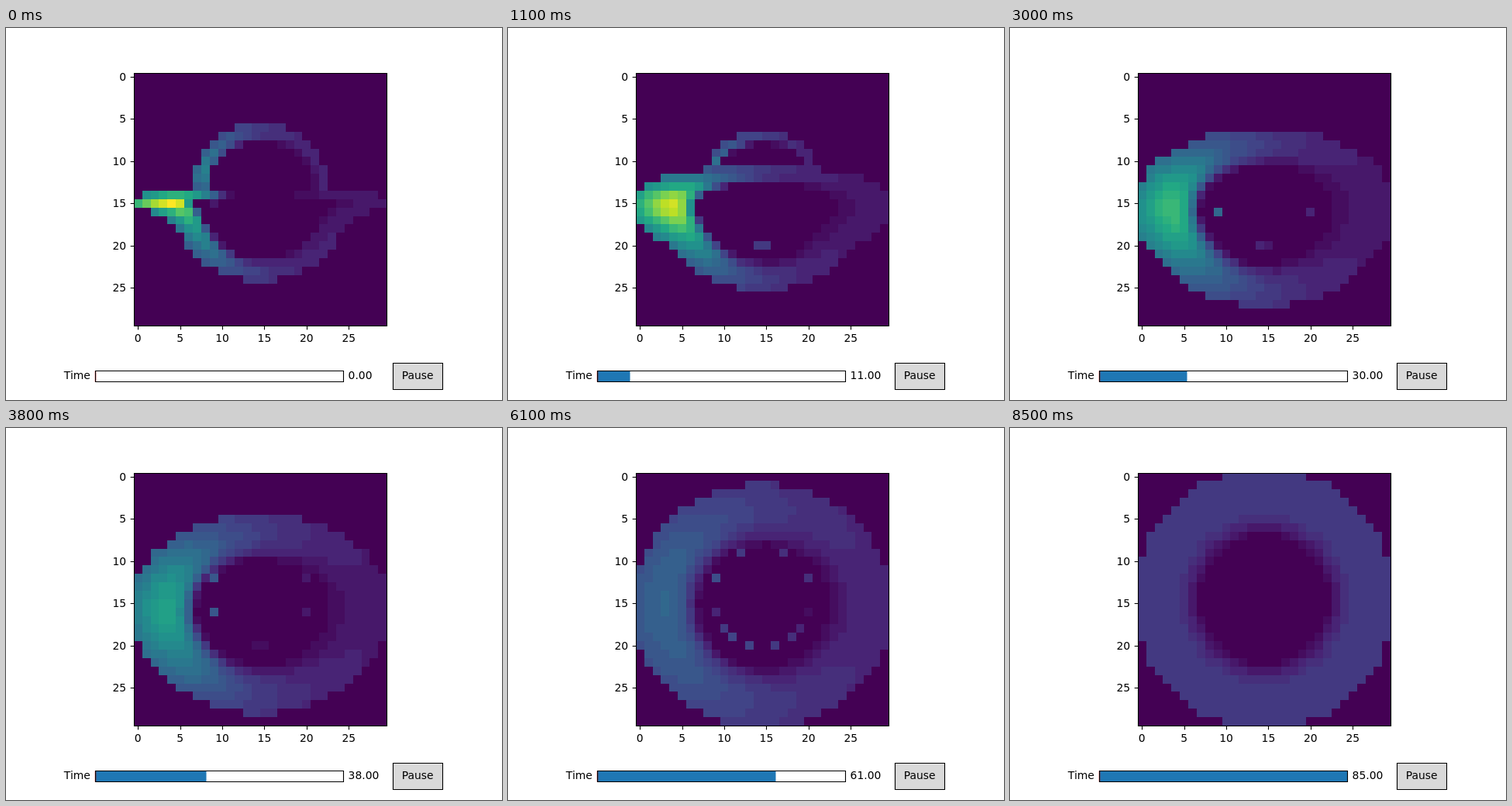
Animation of 640 by 480 pixels, one loop 8.6 s. Source, as an HTML page:

```html
<!DOCTYPE html>
<html lang="en">
<head>
<meta charset="utf-8">
<title>Disk</title>
<style>
html, body { margin: 0; width: 100%; height: 100%; overflow: hidden; background: #fff; }
svg { display: block; width: 640px; height: 480px; }
text { font: 13.89px "DejaVu Sans", sans-serif; fill: #000; }
.end { text-anchor: end; }
.mid { text-anchor: middle; }
.line { fill: none; stroke: #000; stroke-width: 1.11; }
</style>
</head>
<body>
<svg id="stage" viewBox="0 0 640 480">
  <rect x="165" y="58" width="326" height="326" fill="#440154"/>
  <g id="cells" shape-rendering="crispEdges"></g>
  <path class="line" d="M165.5 58.5H491.5V384.5H165.5Z"/>
  <g id="ticks"></g>
  <text class="end" x="108.8" y="453">Time</text>
  <rect id="bar" x="115.5" y="442.5" height="14" fill="#1f77b4"/>
  <path d="M115.5 442.5V456.5" stroke="#f00" stroke-width="1.39"/>
  <path class="line" d="M115.5 442.5H435.5V456.5H115.5Z"/>
  <text id="value" x="441.6" y="453">0.00</text>
  <path class="line" style="fill:#d9d9d9" d="M499.5 432.5H563.5V466.5H499.5Z"/>
  <text class="mid" x="531.2" y="453">Pause</text>
</svg>
<script>
const N = 30, CELL = 10.88, LEFT = 164.8, TOP = 57.6;
const STEPS = 86, STEP_MS = 100, START_DEG = 85;
const HALF = 14, R_IN = 6, R_OUT = 13.995;
const LEVELS = 30, RAD = Math.PI / 180;
const $ = id => document.getElementById(id);

function add(parent, name, attrs, text) {
  const el = document.createElementNS('http://www.w3.org/2000/svg', name);
  for (const k in attrs) el.setAttribute(k, attrs[k]);
  if (text !== undefined) el.textContent = text;
  parent.appendChild(el);
  return el;
}

const stops = ['440154', '482475', '414487', '35608d', '2a788e', '21918c',
  '22a884', '44bf70', '7ad151', 'bddf26', 'fde725']
  .map(h => [0, 2, 4].map(i => parseInt(h.substr(i, 2), 16)));

function viridis(v) {
  const p = Math.min(Math.max(v, 0), 1) * (stops.length - 1);
  const i = Math.min(Math.floor(p), stops.length - 2);
  return 'rgb(' + stops[i].map((c, k) =>
    Math.round(c + (stops[i + 1][k] - c) * (p - i))) + ')';
}

// Light path around the hole: u = 1/r for each degree of travel (u'' = 3u² - u).
function lightPath(b) {
  const path = new Float64Array(362), h = RAD, acc = u => 3 * u * u - u;
  let u = 0, w = 1 / b;
  for (let k = 1; k < path.length; k++) {
    const a1 = acc(u);
    const w2 = w + a1 * h / 2, a2 = acc(u + w * h / 2);
    const w3 = w + a2 * h / 2, a3 = acc(u + w2 * h / 2);
    const w4 = w + a3 * h, a4 = acc(u + w3 * h);
    u += h / 6 * (w + 2 * w2 + 2 * w3 + w4);
    w += h / 6 * (a1 + 2 * a2 + 2 * a3 + a4);
    if (u <= 0) break;
    if (u > 0.5) { path.fill(1, k); break; }
    path[k] = u;
  }
  return path;
}

function radiusAt(path, phi) {
  const p = phi / RAD, k = Math.floor(p);
  return 1 / (path[k] + (path[k + 1] - path[k]) * (p - k));
}

// Thin disk flux, before the frequency shift.
function flux(r) {
  const q = Math.sqrt(r), a = Math.sqrt(3), c = Math.sqrt(6);
  const log = Math.log((q + a) * (c - a) / ((q - a) * (c + a)));
  return (q - c + a / 2 * log) / ((r - 3) * r ** 2.5);
}

function brightness(cell, tilt) {
  const s = Math.sin(tilt);
  const phi = Math.atan2(Math.cos(tilt), -s * cell.y / cell.b);
  for (const turn of [0, Math.PI]) {
    const r = radiusAt(cell.path, phi + turn);
    if (r > R_IN && r < R_OUT) {
      const shift = 1 + cell.x * s * r ** -1.5;
      return flux(r) * (1 - 3 / r) ** 2 / shift ** 4;
    }
  }
  return 0;
}

const cells = [];
const edge = (start, k) => Math.round(start + k * CELL);
for (let row = 0; row < N; row++) {
  for (let col = 0; col < N; col++) {
    const x = (2 * col / (N - 1) - 1) * HALF, y = (2 * row / (N - 1) - 1) * HALF;
    const b = Math.hypot(x, y), px = edge(LEFT, col), py = edge(TOP, row);
    const el = add($('cells'), 'rect', {
      x: px, y: py,
      width: edge(LEFT, col + 1) - px, height: edge(TOP, row + 1) - py
    });
    cells.push({ x, y, b, el, path: lightPath(b) });
  }
}
const peak = Math.max(...cells.map(c => brightness(c, START_DEG * RAD)));

for (let v = 0; v < N; v += 5) {
  const x = LEFT + (v + 0.5) * CELL, y = TOP + (v + 0.5) * CELL;
  add($('ticks'), 'path', { class: 'line', d: `M${Math.round(x) + 0.5} 384.5v4.86` });
  add($('ticks'), 'path', { class: 'line', d: `M165.5 ${Math.round(y) + 0.5}h-4.86` });
  add($('ticks'), 'text', { class: 'mid', x, y: 405 }, v);
  add($('ticks'), 'text', { class: 'end', x: 155.1, y: Math.round(y + 5) }, v);
}

function draw(step) {
  const tilt = (START_DEG - step) * RAD;
  for (const c of cells) {
    const v = Math.round(brightness(c, tilt) / peak * LEVELS) / LEVELS;
    c.el.setAttribute('fill', viridis(v));
  }
  $('bar').setAttribute('width', Math.round(115.2 + 320 * step / (STEPS - 1)) - 115);
  $('value').textContent = step.toFixed(2);
}

let shown = -1;
const begin = performance.now();
function tick() {
  const step = Math.floor((performance.now() - begin) / STEP_MS) % STEPS;
  if (step !== shown) draw(shown = step);
  requestAnimationFrame(tick);
}
tick();
</script>
</body>
</html>
```
